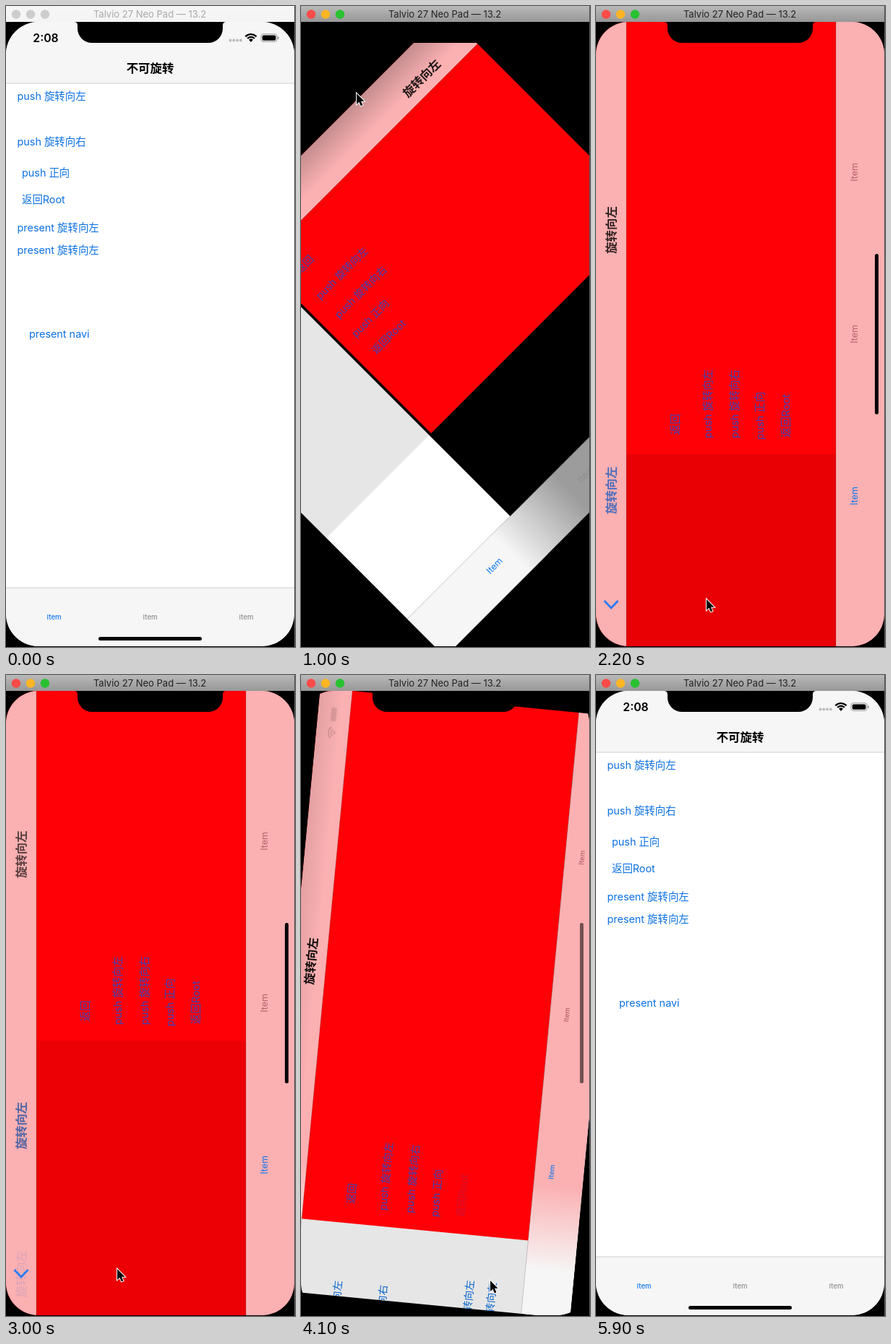
These frames come from a looping animation (400x887 px, 6000 ms). An HTML page with a canvas:

```html
<!DOCTYPE html>
<html lang="zh-CN">
<head>
<meta charset="utf-8">
<style>
  html, body { margin: 0; width: 100%; height: 100%; overflow: hidden; background: #000; }
  canvas { display: block; }
</style>
</head>
<body>
<canvas id="stage" width="400" height="887"></canvas>
<script>
const ctx = document.getElementById('stage').getContext('2d');
const FONT = 'Inter, "Noto Sans CJK SC", "Noto Sans CJK", sans-serif';
const SHORT = 399, LONG = 864, TOP = 22, LOOP = 6000, STEP = 100;
const RED = '#ff0006', PINK = '#fbb0b2', BLUE = '#0b70e2', LEFT = '旋转向左', ROOT = '不可旋转';
const PUSH = [847, 2067, 2896], POP = 4046, TURN = 340;

const clamp = v => Math.max(0, Math.min(1, v));
const ramp = (t, from, to) => clamp((t - from) / (to - from));
const ease = v => (1 - Math.cos(Math.PI * clamp(v))) / 2;
const spring = ms => { const x = Math.max(0, ms) * 0.01807; return 1 - (1 + x) * Math.exp(-x); };

function rect(x, y, w, h, color) {
  ctx.fillStyle = color;
  ctx.fillRect(x, y, w, h);
}

function round(x, y, w, h, r, color) {
  ctx.beginPath();
  ctx.roundRect(x, y, w, h, r);
  ctx.fillStyle = color;
  ctx.fill();
}

function dot(x, y, r, color) {
  ctx.beginPath();
  ctx.arc(x, y, r, 0, 7);
  ctx.fillStyle = color;
  ctx.fill();
}

function faded(alpha, draw) {
  if (alpha <= 0.005) return;
  ctx.save();
  ctx.globalAlpha *= clamp(alpha);
  draw();
  ctx.restore();
}

function text(str, x, y, size, color, align = 'left', weight = 400) {
  ctx.font = `${weight} ${size}px ${FONT}`;
  ctx.textAlign = align;
  ctx.fillStyle = color;
  ctx.fillText(str, x, y + size * 0.36);
}

const title = (str, x, y, color = '#000') => text(str, x, y, 16.4, color, 'center', 600);

function buttons(list, color, pressed) {
  list.forEach(([str, x, y], i) =>
    faded(i === pressed ? 0.25 : 1, () => text(str, x, y, 14.4, color)));
}

const ROOT_BUTTONS = [
  ['push 旋转向左', 15.5, 103], ['push 旋转向右', 15.5, 166], ['push 正向', 22, 209],
  ['返回Root', 22, 246], ['present 旋转向左', 15.5, 285], ['present 旋转向左', 15.5, 316],
  ['present navi', 32, 432]
];
const RED_BUTTONS = [
  ['返回', 27, 110], ['push 旋转向左', 22, 155], ['push 旋转向右', 22, 192],
  ['push 正向', 20, 227], ['返回Root', 23, 263]
];

function rootPage(x, height, dim, pressed) {
  ctx.save();
  ctx.translate(x, 0);
  rect(0, 0, SHORT, height, '#fff');
  buttons(ROOT_BUTTONS, BLUE, pressed);
  rect(0, 0, SHORT, Math.min(height, SHORT), `rgba(0,0,0,${dim})`);
  ctx.restore();
}

function redPage(x, dim, pressed) {
  ctx.save();
  ctx.translate(x, 0);
  rect(0, 0, LONG, SHORT, RED);
  buttons(RED_BUTTONS, '#3b45b8', pressed);
  rect(0, 0, LONG, SHORT, `rgba(0,0,0,${dim})`);
  ctx.restore();
}

// Translucent bar: light over the root page, tinted past the red page's edge.
function bar(y, w, h, edge, tint) {
  const g = ctx.createLinearGradient(edge - 40, 0, edge + 80, 0);
  g.addColorStop(0, '#f6f6f6');
  g.addColorStop(1, tint);
  rect(0, y, w, h, g);
}

function chevron(y) {
  ctx.beginPath();
  ctx.moveTo(63, y - 9.5);
  ctx.lineTo(53, y);
  ctx.lineTo(63, y + 9.5);
  ctx.strokeStyle = '#2a7cf5';
  ctx.lineWidth = 2.8;
  ctx.stroke();
}

function statusBar(w) {
  text('2:08', 55, 22, 15.8, '#000', 'center', 600);
  for (let i = 0; i < 4; i++) dot(w - 88.5 + i * 4.8, 25.5, 1.9, '#b9b9b9');
  const x = w - 60;
  ctx.strokeStyle = '#000';
  ctx.lineWidth = 2.3;
  for (const r of [10.4, 6.6]) {
    ctx.beginPath();
    ctx.arc(x, 27.5, r, -Math.PI * 0.76, -Math.PI * 0.24);
    ctx.stroke();
  }
  ctx.beginPath();
  ctx.moveTo(x, 28);
  ctx.arc(x, 27.5, 4, -Math.PI * 0.76, -Math.PI * 0.24);
  ctx.fillStyle = '#000';
  ctx.fill();
  ctx.beginPath();
  ctx.roundRect(w - 46, 16.8, 22, 10.6, 3);
  ctx.strokeStyle = '#999';
  ctx.lineWidth = 1;
  ctx.stroke();
  round(w - 44.3, 18.4, 18.7, 7.4, 1.8, '#000');
  round(w - 23, 20.2, 1.6, 4, 1, '#999');
}

function screen(t) {
  const land = ease((t - 830) / TURN) - ease((t - POP) / TURN);
  const w = SHORT + (LONG - SHORT) * land, h = LONG - (LONG - SHORT) * land;
  const nav = 85 - 43 * land, tab = 81 - 14 * land, navY = nav - 21;
  const popping = t >= POP, started = t >= PUSH[0];
  const depth = PUSH.filter(at => t >= at).length;
  const p = depth ? spring(t - PUSH[depth - 1]) : 0, q = spring(t - POP);

  ctx.save();
  ctx.translate(199.5, TOP + LONG / 2);
  ctx.rotate(-Math.PI / 2 * land);
  ctx.translate(-w / 2, -h / 2);
  ctx.beginPath();
  ctx.rect(0, 0, w, h);
  ctx.clip();

  let edge = -99;
  if (popping) {
    edge = SHORT * q;
    rootPage(-0.3 * SHORT * (1 - q), h, 0.13 * (1 - q));
    if (q < 0.997) redPage(edge, 0, t < 4250 ? 4 : -1);
    else edge = 999;
  } else if (depth < 2) {
    edge = LONG * (1 - p);
    rootPage(-0.3 * LONG * p, h, 0.13 * p, t >= 700 && t < 900 ? 0 : -1);
    if (started) redPage(edge, 0, t >= 1950 ? 1 : -1);
    else edge = 999;
    if (p > 0.97) edge = -99;
  } else {
    redPage(-0.3 * LONG * p, 0.13 * p);
    redPage(LONG * (1 - p), 0, (t >= 2750 && t < PUSH[2]) ? 1 : t >= 3920 ? 4 : -1);
  }

  bar(0, w, nav, edge, PINK);
  bar(h - tab, w, tab, edge, '#9c9c9c');
  faded(2 * clamp((SHORT - h + tab) / tab), () => bar(h - tab, w, tab, edge, PINK));
  const shade = ctx.createLinearGradient(0, 0, 0, nav);
  shade.addColorStop(0, 'rgba(70,60,60,.3)');
  shade.addColorStop(0.7, 'rgba(70,60,60,0)');
  faded(Math.sqrt(Math.max(0, Math.sin(Math.PI * land))), () => rect(0, 0, w, nav, shade));
  rect(0, nav - 0.5, w, 1, 'rgba(0,0,0,.18)');
  rect(0, h - tab - 0.5, w, 1, 'rgba(0,0,0,.18)');

  if (popping) {
    faded(1 - q * q, () => title(LEFT, w / 2 + 157 * q, navY));
    faded(2 * q - 1, () => title(ROOT, w / 2 - 100 * (1 - q), navY));
  } else if (!started) {
    title(ROOT, w / 2, navY);
  } else {
    const old = depth > 1 ? LEFT : ROOT;
    const oldX = w / 2 - 330 * Math.pow(p, 1.15);
    faded(1 - p, () => title(old, oldX, navY));
    faded(p, () => text(old, oldX, navY, 16.4, '#2a6ee0', 'center', p > 0.9 ? 400 : 600));
    faded(Math.min(1, p * 1.15), () => title(LEFT, LONG / 2 + 468 * (1 - p), navY));
    faded(depth > 1 ? 1 : p, () => chevron(navY));
    if (depth > 1)
      faded(1 - p * 1.5, () =>
        text(depth > 2 ? LEFT : ROOT, 102 - 80 * p, navY, 16.4, '#2a6ee0', 'center'));
  }
  faded(popping ? 2 * (1 - land) : 1 - 2.5 * land, () => statusBar(w));

  const wide = started && !popping;
  for (let i = -1; i < 2; i++) {
    const muted = land > 0.8 ? '#b4636b' : '#8e8e90';
    text('Item', w / 2 + i * (133 + 91 * land), h - tab + 41 - 16 * land - (popping ? 3 * land : 0),
      wide ? 12.5 : 9.6, i < 0 ? '#0f78f0' : muted, 'center', wide ? 400 : 500);
  }
  ctx.restore();
}

function notch() {
  ctx.beginPath();
  ctx.moveTo(94, TOP);
  ctx.quadraticCurveTo(99, TOP, 99, TOP + 5);
  ctx.arcTo(99, 51, 120, 51, 20);
  ctx.arcTo(300, 51, 300, 30, 20);
  ctx.lineTo(300, TOP + 5);
  ctx.quadraticCurveTo(300, TOP, 305, TOP);
  ctx.fillStyle = '#000';
  ctx.fill();
}

function homeIndicator(t) {
  const portrait = t < POP ? 1 - ramp(t, 800, 900) : ramp(t, 4310, 4760);
  const landscape = ramp(t, 1150, 1400) * (1 - ramp(t, POP, 4165));
  faded(portrait, () => round(128, 873, 143, 5, 2.5, '#000'));
  faded(landscape, () => round(386, 343, 5, 222, 2.5, '#000'));
}

function titleBar(active) {
  const g = ctx.createLinearGradient(0, 0, 0, TOP);
  g.addColorStop(0, active ? '#b9b9b9' : '#f6f6f6');
  g.addColorStop(1, active ? '#979797' : '#f4f4f4');
  rect(0, 0, SHORT, TOP, g);
  ['#fc4b48', '#fdb524', '#28c131'].forEach((c, i) =>
    dot(14 + i * 20, 11.5, 6.2, active ? c : '#cdcdcd'));
  text('Talvio 27 Neo Pad — 13.2', 199, 11.8, 13, active ? '#222' : '#a8a8a8', 'center');
}

const MOVES = [
  [200, -15, 190], [500, 77, 121], [1100, 77, 121], [1700, 153, 821], [2400, 153, 821],
  [2800, 154, 822], [3400, 154, 822], [3800, 262, 838], [4900, 262, 838], [5500, 412, 760]
];

function cursor(t) {
  const i = MOVES.findIndex(m => m[0] > t);
  if (i < 1) return;
  const [a, b] = [MOVES[i - 1], MOVES[i]];
  const k = ease(ramp(t, a[0], b[0]));
  ctx.save();
  ctx.translate(a[1] + (b[1] - a[1]) * k, a[2] + (b[2] - a[2]) * k);
  const shape = new Path2D('M0 0V15L3.4 11.8 5.8 17.3 8.4 16.2 6 10.8H10.6Z');
  ctx.strokeStyle = '#fff';
  ctx.lineWidth = 2;
  ctx.stroke(shape);
  ctx.fillStyle = '#000';
  ctx.fill(shape);
  ctx.restore();
}

function frame(now) {
  const t = Math.floor((now % LOOP) / STEP) * STEP;
  rect(0, 0, 400, 887, '#000');
  rect(399, 0, 1, 887, '#555');
  ctx.save();
  ctx.beginPath();
  ctx.roundRect(0, TOP, SHORT, LONG, 45);
  ctx.clip();
  screen(t);
  ctx.restore();
  notch();
  homeIndicator(t);
  titleBar(t >= 400);
  cursor(t);
  requestAnimationFrame(frame);
}
requestAnimationFrame(frame);
</script>
</body>
</html>
```
